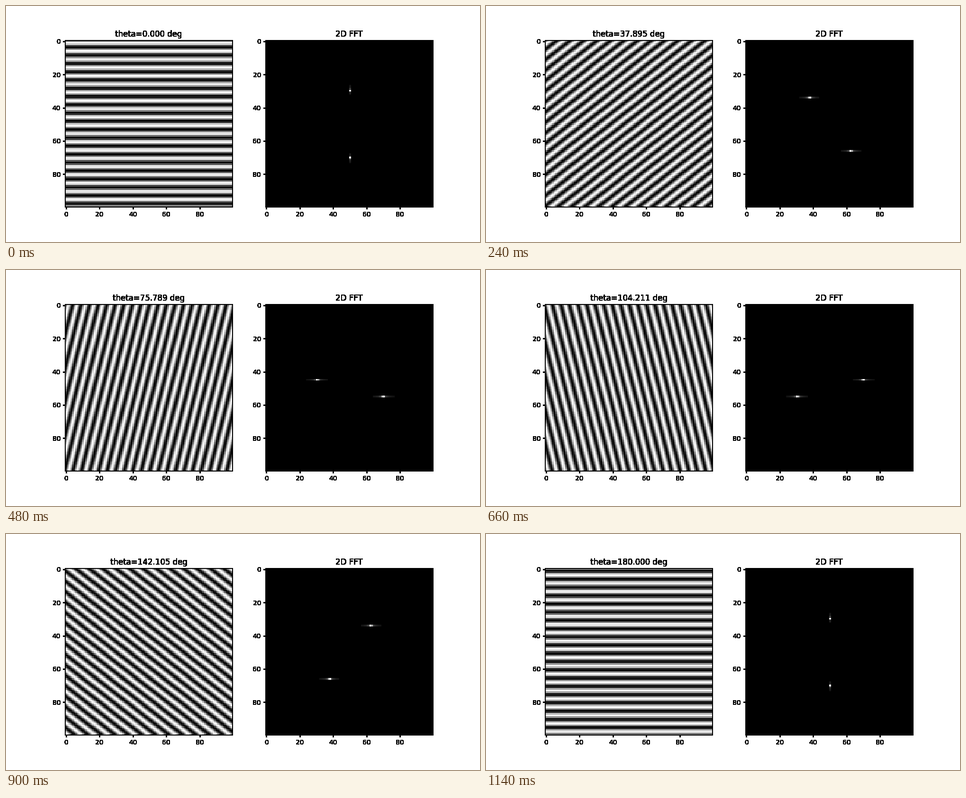
Animation of 1000 by 500 pixels, one loop 1.2 s. Source, as a matplotlib script:

```python
import numpy as np
import matplotlib.pyplot as plt
from matplotlib.animation import FuncAnimation

SIZE = 100      # samples per side
WAVES = 20      # cycles across the picture
FRAMES = 20
STEP_MS = 60
FLOOR = 0.065   # faint leakage below this stays black

angles = np.linspace(0, 180, FRAMES)
x, y = np.meshgrid(np.linspace(0, 1, SIZE), np.linspace(0, 1, SIZE))


def grating(deg):
    t = np.radians(deg)
    return np.sin(2 * np.pi * WAVES * (x * np.sin(t) + y * np.cos(t)))


def spectrum(wave):
    mag = np.abs(np.fft.fftshift(np.fft.fft2(wave)))
    mag /= mag.max()
    return np.where(mag < FLOOR, 0, mag)


def harden(rgba, dpi):
    """Make every touched pixel opaque, so edges have no soft fringe."""
    out = np.round(rgba * 255).astype(np.uint8)
    out[..., 3] = np.where(out[..., 3] > 0, 255, 0)
    return out, 0, 0


def show(ax, data, low):
    ax.patch.set_visible(False)
    ax.set_agg_filter(harden)
    return ax.imshow(data, cmap="gray", vmin=low, vmax=1, interpolation="nearest")


fig, (left, right) = plt.subplots(1, 2, figsize=(10, 5), dpi=100, facecolor="white")
fig.subplots_adjust(left=0.125, right=0.9, bottom=0.102, top=0.902, wspace=0.2)

wave_img = show(left, grating(0), -1)
fft_img = show(right, spectrum(grating(0)), 0)
title = left.set_title("")
right.set_title("2D FFT")


def update(i):
    wave = grating(angles[i])
    wave_img.set_data(wave)
    fft_img.set_data(spectrum(wave))
    title.set_text(f"theta={angles[i]:.3f} deg")
    return wave_img, fft_img, title


anim = FuncAnimation(fig, update, frames=FRAMES, interval=STEP_MS,
                     repeat=True, repeat_delay=0, blit=False)
plt.show()
```
